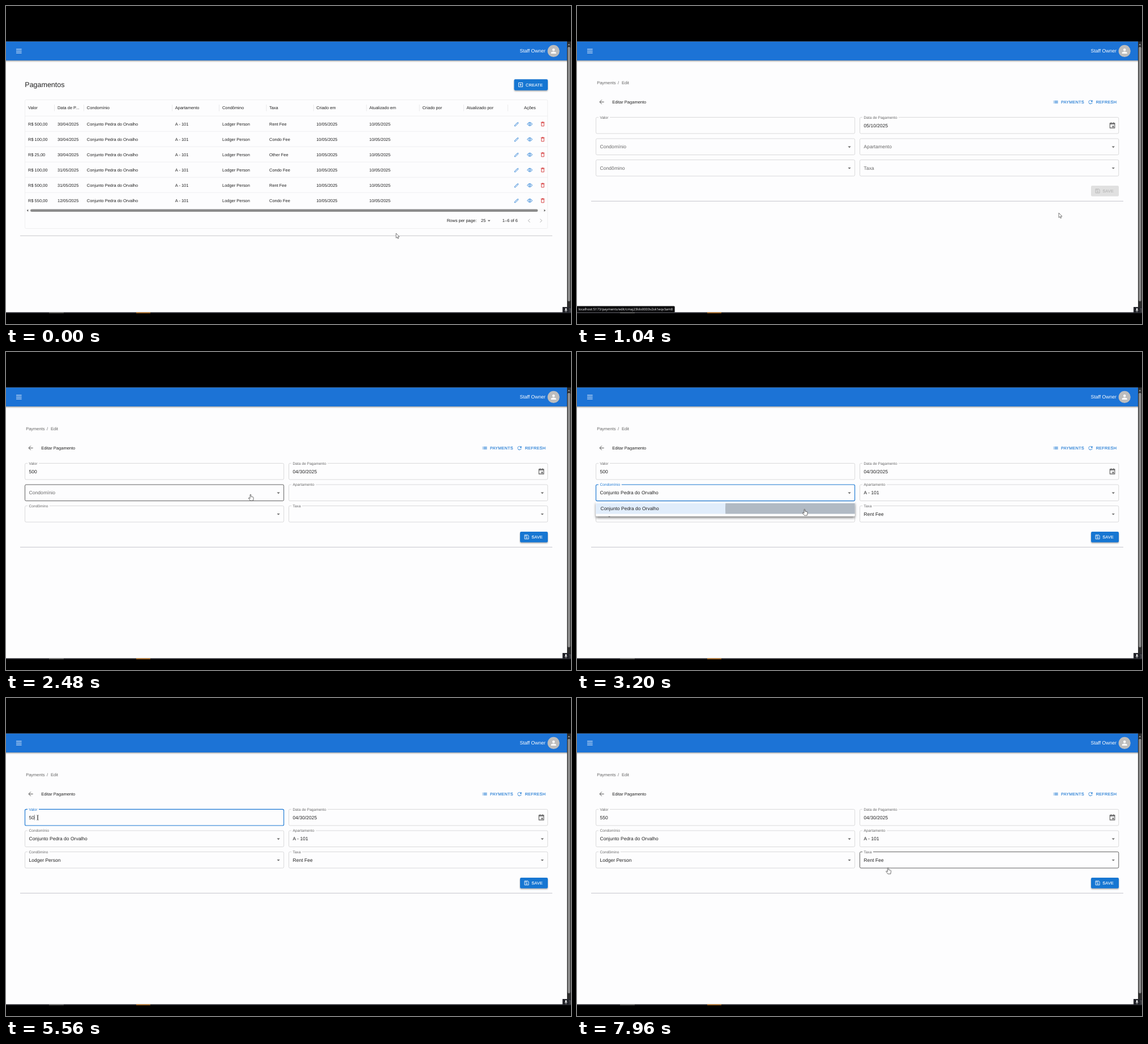
An HTML page that plays this animation: 998 by 561 pixels, repeating every 8000 ms.

```html
<!DOCTYPE html>
<html lang="pt">
<head>
<meta charset="utf-8">
<title>Pagamentos</title>
<style>
  html, body { margin: 0; width: 100%; height: 100%; overflow: hidden; background: #000; }
  svg { display: block; width: 100vw; height: 100vh; }
  text { font-family: "Liberation Sans", Arial, sans-serif; text-rendering: geometricPrecision; white-space: pre; }
</style>
</head>
<body>
<svg id="stage" viewBox="0 0 998 561">
  <defs>
    <filter id="soft" x="-10%" y="-60%" width="120%" height="260%">
      <feDropShadow dx="0" dy="1.4" stdDeviation="1.3" flood-opacity=".38"/>
    </filter>
    <filter id="lift" x="-5%" y="-50%" width="110%" height="260%">
      <feDropShadow dx="0" dy="2.6" stdDeviation="2.2" flood-opacity=".5"/>
    </filter>
    <clipPath id="itemClip"><rect x="33.3" y="266.8" width="457.5" height="18.8"/></clipPath>
    <clipPath id="pageClip"><rect y="62.5" width="991" height="478"/></clipPath>
  </defs>
</svg>
<script>
const LOOP = 8000;
const BLUE = '#1976d2', INK = '#212121', GRAY = '#666', BG = '#fdfdfe', RED = '#d32f2f';
const ESTATE = 'Conjunto Pedra do Orvalho', RESIDENT = 'Lodger Person', ACCOUNT = 'Staff Owner';
const stage = document.getElementById('stage');

// Timeline, ms
const T = {
  open: 800, data: 1640, statusOff: 1700, options: 2560, menuOpen: 2680, ripple: 3060,
  menuClose: 3240, focusValue: 4480, blur: 7480
};

function add(parent, tag, attrs = {}, content) {
  const el = document.createElementNS('http://www.w3.org/2000/svg', tag);
  for (const k in attrs) el.setAttribute(k, attrs[k]);
  if (content !== undefined) el.textContent = content;
  parent.append(el);
  return el;
}
const set = (el, attrs) => { for (const k in attrs) el.setAttribute(k, attrs[k]); };
const show = (el, on) => el.setAttribute('visibility', on ? 'visible' : 'hidden');
const group = (parent, attrs) => add(parent, 'g', attrs);
const rect = (p, x, y, width, height, fill, more) => add(p, 'rect', { x, y, width, height, fill, ...more });
const line = (p, d, stroke, w = 0.6) => add(p, 'path', { d, stroke, 'stroke-width': w, fill: 'none' });
const text = (p, x, y, s, size, fill = INK, more) =>
  add(p, 'text', { x, y, 'font-size': size, fill, ...more }, s);
const button = (p, x, y, s, fill) => text(p, x, y, s, 7.3, fill, { 'letter-spacing': 0.21, stroke: fill, 'stroke-width': 0.12 });

// Icons on a 24-unit grid; those marked as strokes are outlined
const ICONS = {
  menu: ['M3 6h18M3 12h18M3 18h18', 1],
  pencil: ['M4 20v-3L15 6l3 3L7 20zM17 4.500l2.500 2.500', 1],
  eye: ['M2 12q10-14 20 0q-10 14-20 0zM8.500 12a3.500 3.500 0 1 0 7 0a3.500 3.500 0 1 0-7 0', 1],
  trash: ['M7 7v13h10V7zM4.500 5h15M9 3.800h6', 1],
  plus: ['M4 4h16v16H4zM12 7.500v9M7.500 12h9', 1],
  list: ['M3 8h2M3 12h2M3 16h2M7 8h14M7 12h14M7 16h14', 1],
  save: ['M4 4h13l3 3v13H4zM6 8h9M12 13a2 2 0 1 0 .1 0z', 1],
  event: ['M4 5h16v15.500H4zM4 7.500h16M8 2v3M16 2v3M13 14h3v3h-3z', 1],
  prev: ['M15 6l-6 6 6 6', 1],
  next: ['M9 6l6 6-6 6', 1],
  back: ['M20 12H5M12 4.500L4.700 12l7.300 7.500', 1],
  refresh: ['M17.600 6.400A8 8 0 1 0 19.700 14h-2.100A6 6 0 1 1 16.200 7.800L13 11h7V4z', 0],
  down: ['M7 10l5 5 5-5z', 0],
  person: ['M12 12a4 4 0 1 0 0-8a4 4 0 0 0 0 8zM12 14c-2.700 0-8 1.300-8 4v2h16v-2c0-2.700-5.300-4-8-4z', 0]
};
function icon(p, name, cx, cy, size, color) {
  const [d, stroked] = ICONS[name], k = size / 24;
  return add(p, 'path', {
    d, transform: `translate(${cx - size / 2} ${cy - size / 2}) scale(${k})`,
    fill: stroked ? 'none' : color, stroke: stroked ? color : 'none', 'stroke-width': 2
  });
}

rect(stage, 0, 0, 998, 561, '#000');
const page = group(stage, { 'clip-path': 'url(#pageClip)' });
rect(page, 0, 62.5, 991, 479, BG);
const list = group(page), form = group(page);

function buildHeader() {
  rect(page, -5, 62.5, 1001, 33.5, '#1a73d6', { filter: 'url(#soft)' });
  icon(page, 'menu', 22.8, 79.5, 12.8, '#fff');
  text(page, 952.8, 82.4, ACCOUNT, 8.6, '#fff', { 'text-anchor': 'end' });
  add(page, 'circle', { cx: 967.2, cy: 79.4, r: 10.6, fill: '#bdbdbd' });
  icon(page, 'person', 967.2, 79.4, 13.5, '#fff');
}

function buildFrame() {
  rect(stage, 991, 62.5, 7, 479, '#2c2c2c');
  rect(stage, 992.2, 72, 4.4, 449, '#8f8f8f', { rx: 2.2 });
  add(stage, 'path', { d: 'M992.300 69.300h4l-2-2.800z', fill: '#a0a0a0' });
  rect(stage, 0, 540.5, 998, 1.5, '#34343c');
  rect(stage, 76, 540.5, 26, 1.5, '#777');
  rect(stage, 230, 540.5, 25, 1.5, '#c9802f');
  rect(stage, 983, 531, 15, 11, '#25262c');
  rect(stage, 988, 533, 2.2, 4.6, '#fff', { rx: 1.1 });
  line(stage, 'M986.800 536.300q2.300 4 4.600 0M989.100 538.400v2', '#ddd', 0.7);
  line(stage, 'M995 534.500l1.600-1v7', '#777', 0.7);
}

function buildList() {
  text(list, 33.3, 143.2, 'Pagamentos', 12.5);
  rect(list, 897.5, 129.3, 59.5, 19.4, BLUE, { rx: 2.1, filter: 'url(#soft)' });
  icon(list, 'plus', 909, 139, 10.6, '#fff');
  button(list, 918, 141.6, 'CREATE', '#fff');
  rect(list, 33.5, 165.5, 923.2, 227, 'none', { rx: 2, stroke: '#e6e6e8', 'stroke-width': 0.6 });

  const heads = [['Valor', 39], ['Data de P...', 91], ['Condomínio', 142.8], ['Apartamento', 298.8], ['Condômino', 382],
    ['Taxa', 465], ['Criado em', 548.2], ['Atualizado em', 641.8], ['Criado por', 735.5], ['Atualizado por', 813.4]];
  heads.forEach(([s, x]) => text(list, x, 182, s, 7.45));
  text(list, 925.3, 182, 'Ações', 7.45, INK, { 'text-anchor': 'middle' });
  for (const x of [85.5, 137.5, 293.5, 376.5, 460, 543.3, 636.8, 730.2, 808.4, 886.4])
    line(list, `M${x} 174v11.500`, '#dcdcde');

  const rows = [['500,00', '30/04', 'Rent'], ['100,00', '30/04', 'Condo'], ['25,00', '30/04', 'Other'],
    ['100,00', '31/05', 'Condo'], ['500,00', '31/05', 'Rent'], ['550,00', '12/05', 'Condo']];
  const hovers = rows.map((row, i) => {
    const mid = 208.3 + 27 * i;
    const hover = rect(list, 33.8, mid - 13.5, 922.6, 26.6, '#f3f3f4');
    line(list, `M33.500 ${mid - 14.1}H956.700`, '#e6e6e8');
    const cells = ['R$ ' + row[0], row[1] + '/2025', ESTATE, 'A - 101', RESIDENT, row[2] + ' Fee', '10/05/2025', '10/05/2025'];
    cells.forEach((s, c) => text(list, heads[c][1], mid + 2.6, s, 7.46));
    const halo = add(list, 'circle', { cx: 902, cy: mid, r: 8.5, fill: BLUE, opacity: 0.1 });
    icon(list, 'pencil', 902, mid, 10.6, BLUE);
    icon(list, 'eye', 925.2, mid, 10.6, BLUE);
    icon(list, 'trash', 948, mid, 10.6, RED);
    return { mid, hover, halo };
  });

  rect(list, 34, 357.5, 922.4, 6.4, '#fafafb');
  rect(list, 43, 358.4, 896.5, 4.6, '#8b8b8b', { rx: 2.3 });
  add(list, 'path', { d: 'M39.200 358.800v4l-2.500-2zM950.500 358.800v4l2.500-2z', fill: '#555' });
  text(list, 778.7, 381.2, 'Rows per page:', 7.5);
  text(list, 839, 381.2, '25', 7.5);
  icon(list, 'down', 853.2, 378.8, 11.5, GRAY);
  text(list, 876.8, 381.2, '1–6 of 6', 7.5);
  icon(list, 'prev', 924, 378.7, 12, '#aaa');
  icon(list, 'next', 945, 378.7, 12, '#aaa');
  line(list, 'M25 405.300H965', '#c4c4c8', 0.9);
  return hovers;
}

// Outlined field whose label floats into the top border
function makeField(x, y, name, kind) {
  const box = rect(form, x, y, 457.2, 28.6, 'none', { rx: 2.1 });
  const notch = rect(form, x + 4.5, y - 1.2, 0, 2.6, BG);
  const label = text(form, x + 7, 0, name, 8.5);
  const value = text(form, x + 7, y + 17.2, '', 8.45, INK, { 'letter-spacing': 0.04 });
  if (kind === 'select') icon(form, 'down', x + 447.7, y + 14.6, 12.8, '#666');
  if (kind === 'date') icon(form, 'event', x + 446, y + 14.2, 12.8, '#555');
  const width = label.getComputedTextLength();
  return { x, y, kind, box, notch, label, value, width };
}

function drawField(f, { shrink, value, hover, focus }) {
  const size = 8.5 - 2.0 * shrink;
  set(f.box, {
    stroke: focus ? BLUE : hover ? '#2b2b2b' : '#c6c6c8',
    'stroke-width': focus ? 1.15 : hover ? 0.75 : 0.65
  });
  set(f.label, { 'font-size': size, y: f.y + 17.2 - 15 * shrink, fill: focus ? BLUE : GRAY, 'letter-spacing': 0.07 });
  set(f.notch, { width: shrink > 0 ? (f.width * 0.78 + 5) * shrink : 0 });
  f.value.textContent = value;
}

function buildForm() {
  text(form, 35.2, 138.2, 'Payments', 7.5, GRAY);
  text(form, 72, 138.2, '/', 7.5, GRAY);
  text(form, 79, 138.2, 'Edit', 7.5, GRAY);
  icon(form, 'back', 43.7, 169.3, 12, '#555');
  text(form, 62.2, 171.6, 'Editar Pagamento', 7.5);
  icon(form, 'list', 845.6, 169.4, 10.6, BLUE);
  button(form, 855, 171.6, 'PAYMENTS', BLUE);
  icon(form, 'refresh', 907, 169.4, 10.6, BLUE);
  button(form, 916.8, 171.6, 'REFRESH', BLUE);
  line(form, 'M25 344.300H965', '#bfbfc8', 0.9);

  const states = [['#e0e0e0', '#b5b5b5', ''], [BLUE, '#fff', 'url(#soft)']].map(([bg, fg, filter]) => {
    const g = group(form);
    rect(g, 908, 317, 49, 18.8, bg, { rx: 2.1, ...(filter && { filter }) });
    icon(g, 'save', 919.6, 326.3, 10.6, fg);
    button(g, 928.3, 329, 'SAVE', fg);
    return g;
  });
  return states;
}

function buildMenu() {
  const g = group(page);
  rect(g, 33.3, 264.2, 457.5, 25.8, '#fff', { rx: 2, filter: 'url(#lift)' });
  rect(g, 33.3, 266.8, 457.5, 18.8, '#e1edfb');
  const wave = add(g, 'circle', { cx: 403, cy: 276.5, r: 0, fill: '#333', opacity: 0.27, 'clip-path': 'url(#itemClip)' });
  text(g, 41.5, 279, ESTATE, 8.45, INK, { 'letter-spacing': 0.04 });
  return { g, wave };
}

function buildStatus() {
  const g = group(stage);
  rect(g, -2, 529.4, 174.6, 11.2, '#08080a', { rx: 1.5, stroke: '#555', 'stroke-width': 0.4 });
  text(g, 2.5, 537.3, 'localhost:5173/payments/edit/cmaj23ldo0003v2sk1eqv3am8', 5.9, '#fff',
    { style: 'font-family:"Open Sans","Noto Sans",sans-serif' });
  return g;
}

function buildPointer() {
  const arrow = add(stage, 'path', {
    d: 'M0 0v8.300l1.900-1.700 1.300 2.900 1.300-.6-1.300-2.800h2.700z', fill: '#fff', stroke: '#222', 'stroke-width': 0.6
  });
  const hand = add(stage, 'path', {
    d: 'M-.9 .8q.9-1.500 1.700 0v3.200l3.200.7q1.300.4 1.200 1.800l-.7 4.800h-5l-3.200-4.300q.4-1.400 1.600-.6l1.200 1z',
    fill: '#fff', stroke: '#222', 'stroke-width': 0.65
  });
  const beam = line(stage, 'M-1.600-4.300q1.600 0 1.600 1v6.600q0 1-1.600 1M1.600-4.300q-1.600 0-1.600 1v6.600q0 1 1.600 1', '#222', 0.7);
  return { arrow, hand, beam };
}

const rows = buildList();
const [saveOff, saveOn] = buildForm();
const fields = {
  value: makeField(33.5, 196.4, 'Valor', 'text'),
  date: makeField(499.6, 196.4, 'Data de Pagamento', 'date'),
  estate: makeField(33.5, 234, 'Condomínio', 'select'),
  unit: makeField(499.6, 234, 'Apartamento', 'select'),
  resident: makeField(33.5, 271.4, 'Condômino', 'select'),
  fee: makeField(499.6, 271.4, 'Taxa', 'select')
};
const caret = line(form, 'M0 206v9.500', '#222', 0.6);
buildHeader();
const menu = buildMenu();
buildFrame();
const status = buildStatus();
const pointers = buildPointer();

// Pointer stops: time, x, y
const PATH = [[0, 689, 401], [120, 689, 401], [560, 902, 209], [760, 902, 209], [1040, 851, 365], [1320, 815, 396],
  [1680, 800, 380], [2400, 432, 251], [2640, 432, 251], [3000, 402, 277], [3400, 402, 277], [3900, 75, 215],
  [4080, 75, 215], [4280, 56, 211], [6560, 56, 211], [7000, 248.5, 256], [7400, 470, 330], [7560, 470, 330], [7960, 549.5, 299]];
// Typed text: time, content
const TYPED = [[0, ''], [T.data, '500'], [5480, '50'], [5640, '5'], [5840, '55'], [6040, '550']];

const clamp = v => Math.max(0, Math.min(1, v));
const ease = v => { v = clamp(v); return v * v * (3 - 2 * v); };
const last = (table, t) => table.filter(k => k[0] <= t).pop();

function pointerAt(t) {
  const i = PATH.findIndex(k => k[0] > t);
  if (i < 0) return PATH[PATH.length - 1].slice(1);
  const [a, b] = [PATH[i - 1], PATH[i]], k = ease((t - a[0]) / (b[0] - a[0]));
  return [a[1] + (b[1] - a[1]) * k, a[2] + (b[2] - a[2]) * k];
}

function render(t) {
  const [px, py] = pointerAt(t);
  const editing = t >= T.open, filled = t >= T.options;
  const menuOn = t >= T.menuOpen && t < T.menuClose + 160;
  let cursor = 'arrow';

  list.style.display = editing ? 'none' : '';
  form.style.display = editing ? '' : 'none';

  let onPencil = false;
  for (const r of rows) {
    const over = !editing && Math.abs(py - r.mid) < 13.5;
    const near = over && Math.abs(px - 902) < 8;
    r.hover.style.display = over ? '' : 'none';
    r.halo.style.display = near ? '' : 'none';
    onPencil = onPencil || near;
  }
  if (onPencil) cursor = 'hand';

  const focus = t < T.menuOpen ? '' : t < T.focusValue ? 'estate' : t < T.blur ? 'value' : '';
  const typed = last(TYPED, t);
  const values = {
    value: typed[1],
    date: t < T.data ? '05/10/2025' : '04/30/2025',
    estate: filled ? ESTATE : '', unit: filled ? 'A - 101' : '',
    resident: filled ? RESIDENT : '', fee: filled ? 'Rent Fee' : ''
  };
  for (const id in fields) {
    const f = fields[id];
    const inside = editing && px > f.x && px < f.x + 457 && py > f.y && py < f.y + 28.6;
    if (inside && !menuOn) cursor = f.kind === 'select' ? 'hand' : 'beam';
    const floatAt = id === 'estate' ? T.options : T.data;
    const shrink = id === 'value' || id === 'date' ? 1 : ease((t - floatAt) / 200);
    drawField(f, { shrink, value: values[id], hover: inside && !menuOn, focus: focus === id });
  }
  saveOff.style.display = t < T.data ? '' : 'none';
  saveOn.style.display = t < T.data ? 'none' : '';

  const blinkFrom = Math.max(T.focusValue, typed[0]);
  caret.style.display = focus === 'value' && (t - blinkFrom) % 1000 < 500 ? '' : 'none';
  caret.setAttribute('transform', `translate(${40.8 + typed[1].length * 4.74} 0)`);

  menu.g.style.display = menuOn ? '' : 'none';
  const opacity = t < T.menuClose ? ease((t - T.menuOpen) / 180) : 1 - ease((t - T.menuClose) / 160);
  menu.g.setAttribute('opacity', opacity);
  menu.wave.setAttribute('r', Math.max(0, t - T.ripple));
  if (menuOn && py > 264) cursor = 'hand';

  status.style.display = onPencil || (editing && t < T.statusOff) ? '' : 'none';
  for (const k in pointers) {
    show(pointers[k], k === cursor);
    pointers[k].setAttribute('transform', `translate(${px} ${py})`);
  }
}

const start = performance.now();
function tick() {
  render((performance.now() - start) % LOOP);
  requestAnimationFrame(tick);
}
tick();
</script>
</body>
</html>
```
